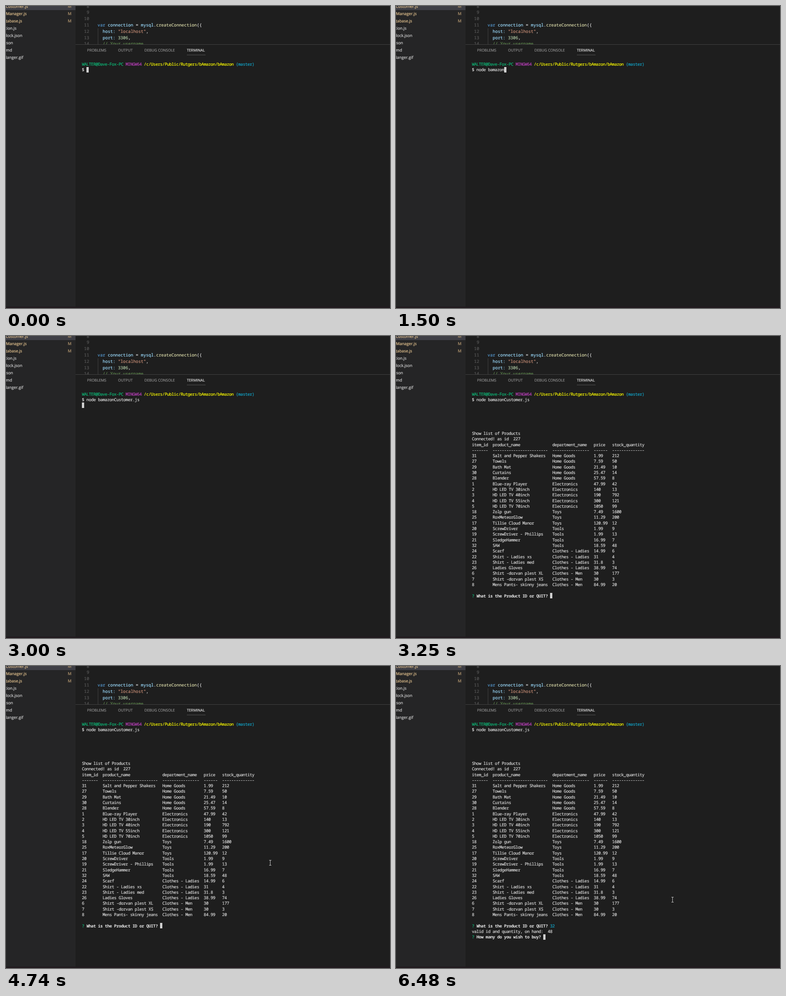
These frames come from a looping animation (845x663 px, 8 s). An HTML page:

```html
<!DOCTYPE html>
<html lang="en">
<head>
<meta charset="utf-8">
<title>Terminal session</title>
<style>
html, body { margin: 0; width: 845px; height: 663px; overflow: hidden; background: #1e1e1e; }
body { position: relative; color: #dcdcdc; text-rendering: geometricPrecision; font-kerning: none; font-variant-ligatures: none; -webkit-text-stroke: .2px; }
div, pre, svg { position: absolute; margin: 0; }
pre { font-family: "Noto Sans Mono", monospace; white-space: pre; }
#side { left: 0; top: 0; width: 152.5px; height: 660px; background: #252526; overflow: hidden; font: 8.85px/16px "Open Sans", sans-serif; color: #d6d6d6; }
#side div { white-space: nowrap; }
#side .sel { left: 0; top: 0; width: 100%; height: 9px; background: #3f3f46; }
#side .mod { color: #e8c691; }
#side .mark { left: 136px; width: 8px; text-align: center; color: #b89b72; }
#edit { left: 152px; top: 0; width: 693px; height: 84px; overflow: hidden; }
#edit pre { top: -6.5px; font-size: 9.33px; line-height: 13.82px; }
#nums { right: 662px; text-align: right; color: #5a5a5a; }
#code { left: 49.6px; }
#guide { left: 50px; top: 49px; width: 1px; height: 35px; background: #404040; }
#panel { left: 152.5px; top: 84px; width: 692.5px; height: 1px; background: #414141; }
.tab { top: 90px; font: 8.2px/15px "Open Sans", sans-serif; color: #929292; white-space: nowrap; }
.tab.on { color: #e7e7e7; }
#under { left: 398px; top: 107px; width: 41px; height: 1px; background: #525252; }
#term { left: 167px; top: 121.9px; font-size: 9.2px; line-height: 12.29px; letter-spacing: -.454px; }
#cursor { width: 5px; height: 12px; background: #d0d0d0; }
#foot { left: 0; top: 660px; width: 845px; height: 3px; background: #20191d; }
.kw { color: #569cd6 } .id { color: #9cdcfe } .fn { color: #dcdcaa } .str { color: #ce9178 }
.num { color: #b5cea8 } .com { color: #608b4e }
.g { color: #0dbc79 } .m { color: #bc3fbc } .y { color: #ffff00 } .c { color: #11a8cd }
b { color: #e5e5e5; -webkit-text-stroke: 0; }
</style>
</head>
<body>
<div id="side"><div class="sel"></div></div>
<div id="edit">
<pre id="nums">8
9
10
11
12
13
14</pre>
<pre id="code">



<span class="kw">var</span> <span class="id">connection</span> = <span class="id">mysql</span>.<span class="fn">createConnection</span>({
  <span class="id">host:</span> <span class="str">"localhost"</span>,
  <span class="id">port:</span> <span class="num">3306</span>,
  <span class="com">// Your username</span></pre>
<div id="guide"></div>
</div>
<div id="panel"></div>
<div class="tab" style="left:178.5px">PROBLEMS</div>
<div class="tab" style="left:246.5px">OUTPUT</div>
<div class="tab" style="left:304.5px">DEBUG CONSOLE</div>
<div class="tab on" style="left:398px">TERMINAL</div>
<div id="under"></div>
<pre id="term"></pre>
<div id="cursor"></div>
<svg id="mouse" width="5" height="12"><path d="M0 .5H5M2.5 1V11M0 11.5H5" stroke="#c4c4c4"/></svg>
<div id="foot"></div>
<script>
const $ = id => document.getElementById(id);
const paint = (cls, text) => `<span class="${cls}">${text}</span>`;

// Sidebar: visible end of each file name and its right edge
[["Customer.js", 48.5], ["Manager.js", 45.5], ["tabase.js", 35.5], ["tion.js", 23],
 ["lock.json", 36], ["son", 15.5], ["md", 13.5], ["Manger.gif", 38]].forEach(([name, end], i) => {
  const top = i * 16 - 7, mod = i < 3;
  $("side").insertAdjacentHTML("beforeend",
    `<div class="${mod ? "mod" : ""}" style="right:${152.5 - end}px;top:${top}px">${name}</div>` +
    (mod ? `<div class="mark" style="top:${top}px">M</div>` : ""));
});

const stock = `item_id|product_name|department_name|price|stock_quantity
-------|------------------------|----------------|------|--------------
31|Salt and Pepper Shakers|Home Goods|1.99|212
27|Towels|Home Goods|7.59|50
29|Bath Mat|Home Goods|21.49|10
30|Curtains|Home Goods|25.47|14
28|Blender|Home Goods|57.59|8
1|Blue-ray Player|Electronics|47.99|42
2|HD LED TV 30inch|Electronics|140|13
3|HD LED TV 40inch|Electronics|190|792
4|HD LED TV 55inch|Electronics|300|121
5|HD LED TV 70inch|Electronics|1050|99
18|Zolp gun|Toys|7.49|1600
25|RoxMeteorGlow|Toys|11.29|200
17|Tillie Cloud Manor|Toys|120.99|12
20|ScrewDriver|Tools|1.99|9
19|ScrewDriver - Phillips|Tools|1.99|13
21|SledgeHammer|Tools|16.99|7
32|SAW|Tools|18.59|48
24|Scarf|Clothes - Ladies|14.99|6
22|Shirt - Ladies xs|Clothes - Ladies|31|4
23|Shirt - Ladies med|Clothes - Ladies|31.8|3
26|Ladies Gloves|Clothes - Ladies|38.99|74
6|Shirt -dorvan plest XL|Clothes - Men|30|177
7|Shirt -dorvan plest XS|Clothes - Men|30|3
8|Mens Pants- skinny jeans|Clothes - Men|84.99|20`;
const pads = [9, 26, 18, 8, 0];
const table = stock.split("\n")
  .map(row => row.split("|").map((cell, i) => cell.padEnd(pads[i])).join("")).join("\n");

const prompt = [paint("g", "WALTER@Dave-Fox-PC"), paint("m", "MINGW64"),
  paint("y", "/c/Users/Public/Rutgers/bAmazon/bAmazon"), paint("c", "(master)")].join(" ") + "\n$ ";
const command = "node bamazonCustomer.js ";
const ask = text => `${paint("g", "?")} <b>${text}</b> `;
const listing = prompt + command + "\n".repeat(6) +
  "Show list of Products\nConnected! as id  227\n" + table + "\n\n" + ask("What is the Product ID or QUIT?");

const typed = n => [prompt + command.slice(0, n), n + 2, 1];
const reply = text => [listing + text, 34 + text.length, 36];

// [start, [text, cursor column, cursor row]]
const screens = [
  [0, typed(0)], [250, typed(2)], [510, typed(4)], [1000, typed(5)], [1250, typed(6)],
  [1500, typed(12)], [2250, typed(24)], [3000, [prompt + command, 0, 2]],
  [3250, reply("")], [5490, reply("3")], [5740, reply("32")],
  [6480, [listing + paint("c", "32") + "\nvalid id and quantity, on hand:  48\n" +
    ask("How many do you wish to buy?"), 31, 38]]
];
// [start, [left, top]]
const pointer = [[0, [-20, 0]], [4000, [470, 404]], [4250, [488, 185]], [4490, [475, 335]],
  [4740, [579, 426]], [4990, [606, 507]]];

const at = (steps, t) => steps.findLast(([start]) => start <= t)[1];
function place(el, x, y) {
  el.style.left = x + "px";
  el.style.top = y + "px";
}

let shown;
function draw(now) {
  const t = Math.max(0, now) % 8000, screen = at(screens, t);
  if (screen !== shown) {
    const [text, col, row] = shown = screen;
    $("term").innerHTML = text;
    place($("cursor"), Math.round(167 + col * 5.066), Math.round(121.9 + row * 12.29));
  }
  place($("mouse"), ...at(pointer, t));
  requestAnimationFrame(draw);
}
draw(performance.now());
</script>
</body>
</html>
```
